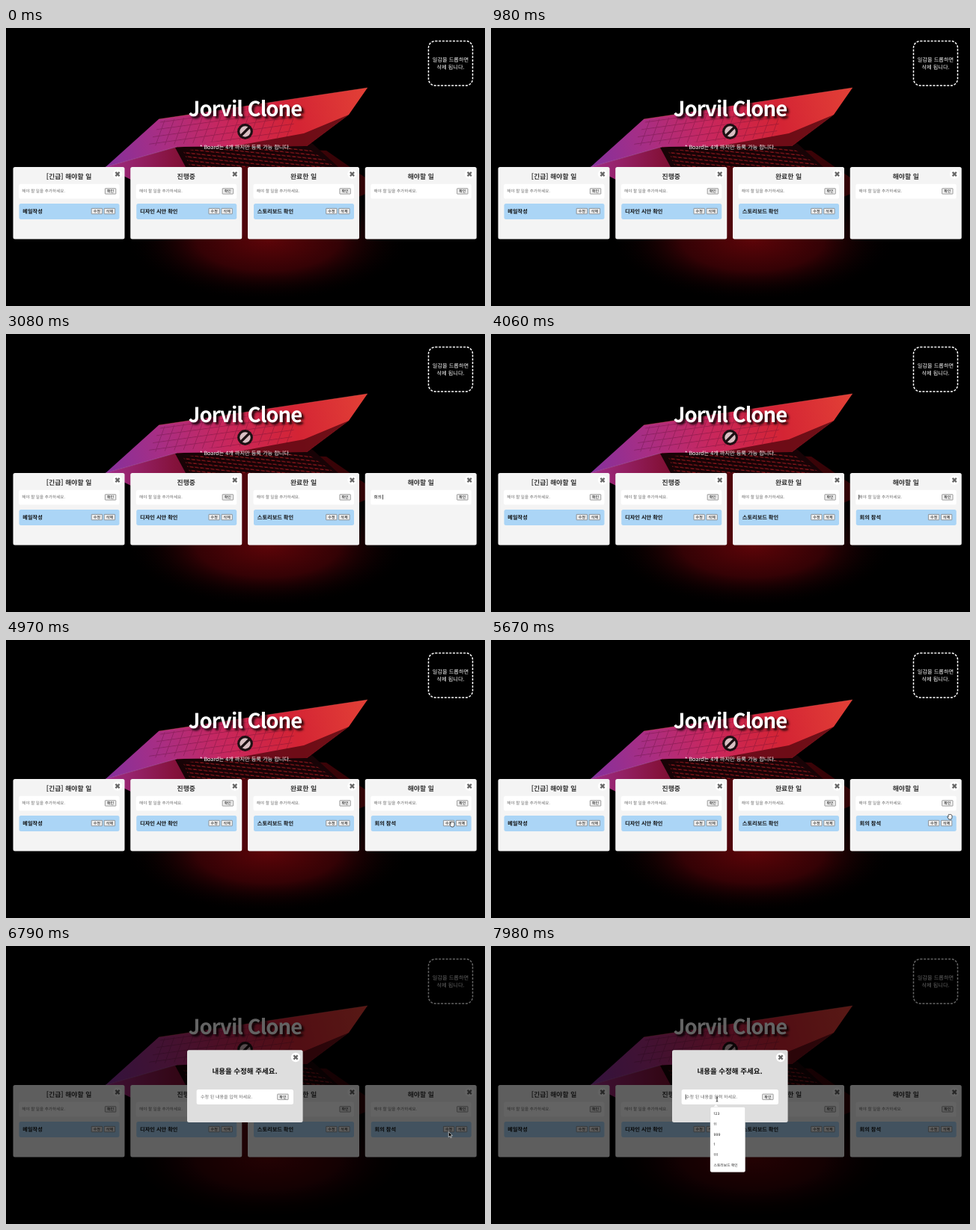
Recreate the animation shown at these times as an HTML page. Size 640x372 px, loop 8000 ms.

```html
<!DOCTYPE html>
<html lang="ko">
<head>
<meta charset="utf-8">
<title>Jorvil Clone</title>
<style>
  html, body { margin: 0; width: 100%; height: 100%; overflow: hidden; background: #000; }
  svg { display: block; width: 100vw; height: 100vh; }
  text {
    font-family: "Noto Sans CJK KR", "Noto Sans CJK JP", "Noto Sans CJK", "Noto Sans", sans-serif;
    text-rendering: geometricPrecision;
    white-space: pre;
  }
  .mid { text-anchor: middle; }
  .bold { font-weight: 700; }
  .light { fill: #fff; font-weight: 500; font-size: 7.2px; }
  .hero { fill: #fff; font-size: 27.5px; letter-spacing: -1px; text-shadow: 3px 3px 3px rgba(0, 0, 0, .85); }
  .head { fill: #333; font-size: 8.9px; }
  .ask { fill: #111; font-size: 9.5px; }
  .task { fill: #111; font-size: 7.2px; }
  .hint { fill: #6c6c6c; font-size: 5.6px; }
  .wide { font-size: 6px; }
  .option { fill: #222; font-size: 4.8px; font-family: Inter, "Noto Sans CJK KR", "Noto Sans CJK JP", sans-serif; }
  .label { fill: #000; font-size: 5px; }
  .button { fill: #efefef; stroke: #767676; stroke-width: .7; }
</style>
</head>
<body>
<svg id="stage" viewBox="0 0 640 372" preserveAspectRatio="none">
  <defs>
    <linearGradient id="lid" gradientUnits="userSpaceOnUse" x1="134" y1="180" x2="483" y2="90">
      <stop offset="0" stop-color="#85309c"/>
      <stop offset=".22" stop-color="#a82e84"/>
      <stop offset=".45" stop-color="#c8275e"/>
      <stop offset=".72" stop-color="#d42434"/>
      <stop offset="1" stop-color="#e24036"/>
    </linearGradient>
    <linearGradient id="base" x1="0" x2="1">
      <stop offset="0" stop-color="#a02c88"/>
      <stop offset=".25" stop-color="#85123c"/>
      <stop offset=".5" stop-color="#50050c"/>
      <stop offset="1" stop-color="#2c0204"/>
    </linearGradient>
    <radialGradient id="glow">
      <stop offset="0" stop-color="#5c0408"/>
      <stop offset=".5" stop-color="#340205"/>
      <stop offset="1" stop-color="#000" stop-opacity="0"/>
    </radialGradient>
    <pattern id="keys" width="13" height="9" patternUnits="userSpaceOnUse" patternTransform="rotate(-8) skewX(-28)">
      <path d="M0 .5H13M.5 0V9" stroke="#50082c" stroke-opacity=".32" fill="none"/>
    </pattern>
    <pattern id="lamps" width="7" height="5" patternUnits="userSpaceOnUse" patternTransform="rotate(6) skewX(30)">
      <path d="M.5 1H5.5" stroke="#a81a20"/>
    </pattern>
  </defs>

  <g id="photo">
    <rect width="640" height="372"/>
    <ellipse cx="350" cy="284" rx="190" ry="82" fill="url(#glow)"/>
    <path d="M133 186L232 158L428 164L500 214L330 284Z" fill="url(#base)"/>
    <path d="M226 160L400 146L444 186H240Z" fill="#180306"/>
    <path d="M236 163L402 160L440 186H246Z" fill="url(#lamps)"/>
    <path d="M133 186L204 122L483 80L458 116L402 158L228 159Z" fill="url(#lid)"/>
    <path d="M207 124L392 101L380 146L190 158Z" fill="url(#keys)"/>
    <path d="M458 116L402 158L300 159L398 141Z" fill="#55070f" opacity=".8"/>
    <path d="M204 122L483 80" stroke="#f2655c" stroke-width=".7" opacity=".5"/>
    <path d="M133 186L228 159" stroke="#d878c8" stroke-width=".8" opacity=".5"/>
  </g>

  <rect x="564.5" y="17.5" width="59" height="59.5" rx="9" fill="none" stroke="#fff" stroke-width="1.5" stroke-dasharray="3 1.7"/>
  <text class="light mid" x="594" y="45.3">일감을 드롭하면</text>
  <text class="light mid" x="594" y="54.8">삭제 됩니다.</text>

  <text class="hero bold mid" x="319.5" y="117.5">Jorvil Clone</text>
  <circle cx="319.5" cy="138.5" r="10.4" fill="#1d1013"/>
  <circle cx="319.5" cy="138.5" r="7.2" fill="#d9bfc3"/>
  <path d="M314 144L325 133" stroke="#1d1013" stroke-width="3.2"/>
  <text class="light mid" x="319.5" y="161.5">* Board는 4개 까지만 등록 가능 합니다.</text>

  <g id="boards"></g>
  <g id="modal"></g>
  <g id="menu"></g>
  <path id="caret" stroke="#000" stroke-width=".7"/>
  <path id="arrow" d="M0 0V7.2L1.7 5.7L2.8 8.2L4 7.7L2.9 5.3H5.2Z" fill="#000" stroke="#fff" stroke-width=".6"/>
  <path id="hand" d="M-2 3L-3.2 .6Q-2.8-.5-1.8 .5L-2-2Q-1.3-3.2-.8-2.2Q0-3.6.7-2.4Q1.6-3.1 2-1.8Q3-2 3 -.8V1.4Q2.9 3 1.9 4H-1Z" fill="#fff" stroke="#111" stroke-width=".7"/>
  <path id="beam" d="M-1.3-3.2Q0-3.2 0-2.4Q0-3.2 1.3-3.2M0-2.4V2.4M-1.3 3.2Q0 3.2 0 2.4Q0 3.2 1.3 3.2" fill="none" stroke="#111" stroke-width=".8"/>
</svg>
<script>
const $ = id => document.getElementById(id);
const LOOP = 8000, OPEN = 6790, ADDED = 3990;
const HINT = '해야 할 일을 추가하세요.';

const text = (x, y, cls, str, id = '') => `<text id="${id}" x="${x}" y="${y}" class="${cls}">${str}</text>`;
const box = (x, y, w, h, fill) => `<rect x="${x}" y="${y}" width="${w}" height="${h}" rx="2.5" fill="${fill}"/>`;
const button = (x, y, label) =>
  `<rect class="button" x="${x + .4}" y="${y + .4}" width="14.4" height="7.4" rx=".5"/>` +
  text(x + 7.6, y + 5.9, 'label mid', label);
const close = (x, y) =>
  `<circle cx="${x}" cy="${y}" r="6.2" fill="#fff"/>` +
  `<path d="M${x - 2.6} ${y - 2.6}l5.2 5.2m0-5.2l-5.2 5.2" stroke="#666" stroke-width="2.2"/>`;

const task = name =>
  box(17.5, 235, 134, 21, '#abd5f6') + text(22.3, 247.9, 'task bold', name) +
  button(113.8, 241, '수정') + button(130.8, 241, '삭제');

const board = ([title, name], i) => `<g transform="translate(${i * 156.75})">
  ${box(9.5, 186, 149, 96.5, '#f4f4f4')}
  ${text(84, 202.4, 'head bold mid', title)}${close(149, 195.5)}
  ${box(17, 208.7, 134.5, 19.8, '#fff')}
  ${text(21.3, 220.2, 'hint', HINT, 'hint' + i)}${button(132, 214.3, '확인')}
  <g id="task${i}">${task(name)}</g></g>`;

$('boards').innerHTML = [
  ['[긴급] 해야할 일', '메일작성'],
  ['진행중', '디자인 시안 확인'],
  ['완료한 일', '스토리보드 확인'],
  ['해야할 일', '회의 참석']
].map(board).join('');

$('modal').innerHTML =
  '<rect width="640" height="372" opacity=".61"/>' +
  box(242, 139.2, 154.6, 96.8, '#dedede') + close(387, 149) +
  text(319, 171.2, 'ask bold mid', '내용을 수정해 주세요.') +
  box(254.6, 192, 129.4, 20, '#fff') +
  text(260, 204.1, 'hint wide', '수정 된 내용을 입력 하세요.') +
  button(362.3, 197.8, '확인');

$('menu').innerHTML =
  '<path d="M4 0L7.5-3.2L11 0Z" fill="#fff"/>' +
  '<rect width="46.6" height="87" rx="2" fill="#fff" stroke="#ccc" stroke-width=".4"/>' +
  ['123', '11', '999', '1', '111', '스토리보드 확인']
    .map((s, i) => text(4.5, 10.4 + i * 13.9, 'option', s)).join('');

// Hangul syllables as they build up in the input
const typed = ['ㅎ', '호', '회', '회ㅇ', '회으', '회의', '회의 ', '회의 ㅊ', '회의 차', '회의 참', '회의 참ㅅ', '회의 참서', '회의 참석'];
const TYPE_FROM = 2400, TYPE_STEP = 112;

// time, x, y of the pointer
const path = [
  [4700, 572, 243], [4970, 596, 246], [5280, 609, 250], [5450, 609, 250],
  [5670, 613, 236], [5950, 600, 244], [6250, 591.3, 248.5], [6950, 591.3, 248.5],
  [7470, 309, 209], [7560, 305, 206], [7630, 302, 205], [8000, 302, 205]
];

function pointer(t) {
  const i = Math.max(1, path.findIndex(p => p[0] > t));
  const [a, b] = [path[i - 1], path[i]];
  const k = (t - a[0]) / (b[0] - a[0]), e = k * k * (3 - 2 * k);
  return [a[1] + (b[1] - a[1]) * e, a[2] + (b[2] - a[2]) * e];
}

const show = (id, on) => { $(id).style.display = on ? '' : 'none'; };
const put = (id, x, y) => $(id).setAttribute('transform', `translate(${x} ${y})`);

function draw(t) {
  const open = t >= OPEN;
  show('task3', t >= ADDED);
  show('modal', open);

  const typing = t >= TYPE_FROM && t < ADDED;
  const n = Math.min(typed.length - 1, Math.floor((t - TYPE_FROM) / TYPE_STEP));
  const field = $('hint3'), value = typing ? typed[n] : HINT;
  if (field.textContent !== value) field.textContent = value;
  field.style.fill = typing ? '#000' : '';

  show('menu', (t >= 1400 && t < TYPE_FROM) || t >= 7860);
  put('menu', open ? 293 : 526.2, open ? 215.4 : 231.4);

  const focus = open ? 7500 : t >= ADDED ? ADDED : 1000;
  show('caret', t >= focus && (typing || (t - focus) % 1000 < 500));
  const cx = open ? 260.2 : 491.6 + (typing ? field.getComputedTextLength() : 0);
  $('caret').setAttribute('d', open ? `M${cx} 198.6V205.4` : `M${cx} 215V221.4`);

  const seen = t >= path[0][0];
  const kind = t >= 7470 ? 'beam' : t >= 6130 || (t >= 5150 && t < 5540) ? 'arrow' : 'hand';
  for (const id of ['arrow', 'hand', 'beam']) show(id, seen && id === kind);
  if (seen) put(kind, ...pointer(t));
}

const start = performance.now();
function tick() {
  draw((performance.now() - start) % LOOP);
  requestAnimationFrame(tick);
}
tick();
</script>
</body>
</html>
```
